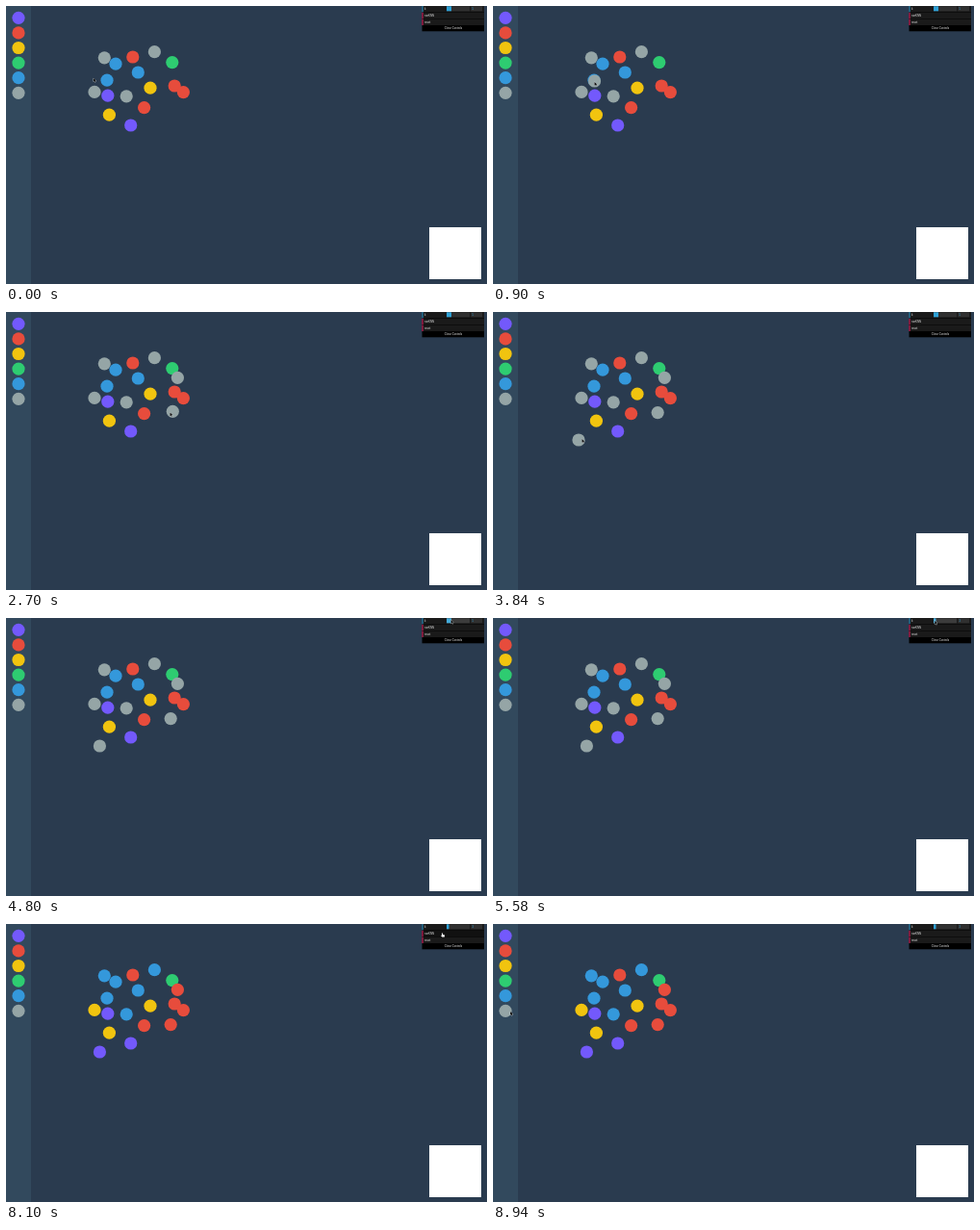
These frames come from a looping animation (500 by 289 pixels, 9000 ms). An HTML page with a canvas:

```html
<!DOCTYPE html>
<html lang="en">
<head>
<meta charset="utf-8">
<title>Nearest neighbours</title>
<style>
html, body { margin: 0; width: 100%; height: 100%; overflow: hidden; background: #2a3b4f; }
canvas { display: block; width: 500px; height: 289px; }
</style>
</head>
<body>
<canvas id="stage"></canvas>
<script>
const LOOP = 9000, CLASSIFY = 6660, K = 3;
const SLIDE = [5040, 5460];
const canvas = document.getElementById('stage');
const ctx = canvas.getContext('2d');
const dpr = window.devicePixelRatio || 1;
canvas.width = 500 * dpr;
canvas.height = 289 * dpr;

// Listed in palette order, top to bottom
const COLORS = {
  purple: '#7359fc', red: '#e74c3c', yellow: '#f1c40f',
  green: '#2ecc71', blue: '#3498db', gray: '#95a5a6'
};
const PALETTE = Object.keys(COLORS).map((kind, i) => ({ kind, x: 13, y: 12.3 + i * 15.6 }));
const SOURCE = PALETTE[5];

// Hand-placed points of each class; gray ones are still unknown
const PLACED = {
  gray: [[102.3, 53.8], [154.4, 47.7], [92, 89.4], [125.2, 93.8]],
  green: [[172.8, 58.6]],
  blue: [[114, 60.2], [137.3, 69], [105, 77.2]],
  red: [[131.8, 53], [175.2, 83], [184.4, 89.6], [143.6, 105.6]],
  yellow: [[150, 85.2], [107.4, 113.2]],
  purple: [[105.8, 93.2], [129.7, 124]]
};
const dots = Object.entries(PLACED).flatMap(
  ([kind, spots]) => spots.map(([x, y]) => ({ kind, x, y })));

// Pointer stops: time, x, y
const STOPS = [
  [0, 91, 75], [480, 13, 91.3], [1260, 178.4, 69.3], [1860, 8, 90],
  [1980, 10.2, 91.5], [2700, 170.5, 104.5], [2880, 168.4, 105.8],
  [3360, 16.5, 89.3], [3840, 92.5, 132], [4080, 100.9, 132],
  [4740, 462.5, 2], [SLIDE[0], 462.5, 2], [SLIDE[1], 460, 2],
  [6060, 453, 9.5], [8100, 453, 9.5], [8880, 18, 91], [LOOP, 18, 91]
];
// Grab and drop times of the points pulled out of the palette
const DRAGS = [[480, 1260], [1980, 2880], [3360, 4080]];

const clamp = (v, lo, hi) => Math.min(hi, Math.max(lo, v));
const ease = u => u * u * (3 - 2 * u);
const mix = (a, b, u) => a + (b - a) * u;

function pointer(t) {
  const i = Math.max(1, STOPS.findIndex(s => s[0] > t));
  const [t0, x0, y0] = STOPS[i - 1], [t1, x1, y1] = STOPS[i];
  const u = ease((t - t0) / (t1 - t0));
  return { x: mix(x0, x1, u), y: mix(y0, y1, u) };
}

function dragged([grab, drop], t) {
  const from = pointer(grab), now = pointer(Math.min(t, drop));
  return { kind: 'gray', x: SOURCE.x + now.x - from.x, y: SOURCE.y + now.y - from.y };
}

// Majority vote of the K nearest known points; a tie goes to the farther class
function classify(p) {
  if (p.kind !== 'gray') return p;
  const dist = q => Math.hypot(p.x - q.x, p.y - q.y);
  const near = dots.filter(q => q.kind !== 'gray')
    .sort((a, b) => dist(a) - dist(b)).slice(0, K);
  const votes = {};
  let kind, best = 0;
  for (const q of near) {
    votes[q.kind] = (votes[q.kind] || 0) + 1;
    if (votes[q.kind] >= best) {
      best = votes[q.kind];
      kind = q.kind;
    }
  }
  return { ...p, kind };
}

function drawDot({ x, y, kind }) {
  ctx.fillStyle = COLORS[kind];
  ctx.beginPath();
  ctx.arc(x, y, 6.6, 0, Math.PI * 2);
  ctx.fill();
}

function rect(x, y, w, h, color) {
  ctx.fillStyle = color;
  ctx.fillRect(x, y, w, h);
}

function label(s, x, y, align = 'left', color = '#eee') {
  ctx.fillStyle = color;
  ctx.textAlign = align;
  ctx.fillText(s, x, y);
}

function drawPanel(t, tip) {
  const level = pointer(clamp(t, ...SLIDE)).x - 457.5;
  const row = Math.floor(tip.y / 6.8);
  const over = tip.x > 432;

  rect(432.5, 0, 64.5, 26.3, '#000');
  ctx.font = '2.8px "Liberation Sans", Arial, sans-serif';
  ctx.textBaseline = 'middle';
  ['k', 'runKNN', 'reset'].forEach((name, i) => {
    const y = i * 6.8;
    rect(432.5, y, 64.5, 6.4, over && i && row === i ? '#111' : '#1a1a1a');
    rect(432.5, y, 1, 6.4, i ? '#e61d5f' : '#2fa1d6');
    label(name, 435, y + 3.2);
  });
  label('Close Controls', 465, 23.3, 'center');

  const hot = over && row === 0;
  rect(458, 0.3, 24, 5, hot ? '#3c3c3c' : '#303030');
  rect(458, 0.3, level, 5, hot ? '#44abda' : '#2fa1d6');
  rect(483.3, 0.3, 11.7, 5, '#303030');
  label(String(Math.round(level)), 484.5, 3, 'left', '#2fa1d6');
}

function polygon(points, fill, line) {
  ctx.beginPath();
  points.forEach(p => ctx.lineTo(...p));
  ctx.closePath();
  ctx.fillStyle = fill;
  ctx.strokeStyle = line;
  ctx.lineWidth = 0.6;
  ctx.stroke();
  ctx.fill();
}

function drawPointer({ x, y }) {
  ctx.save();
  ctx.translate(x, y);
  if (x > 432 && y > 6.8) {
    polygon([[0, 0], [0.9, 0], [1, 1.6], [3, 2], [2.8, 4], [0.3, 4], [-1.2, 2.3], [0, 2.4]],
      '#fff', '#222');
  } else {
    polygon([[0, 0], [0, 3.7], [0.9, 2.9], [1.5, 4.3], [2.1, 4], [1.6, 2.7], [2.7, 2.6]],
      '#111', '#d5dade');
  }
  ctx.restore();
}

function draw(t) {
  const tip = pointer(t);
  const pulled = DRAGS.filter(d => t >= d[0]).map(d => dragged(d, t));
  const points = [...dots, ...pulled];

  ctx.setTransform(dpr, 0, 0, dpr, 0, 0);
  rect(0, 0, 500, 289, '#2a3b4f');
  rect(0, 0, 26, 289, '#32495d');
  rect(440, 230, 54, 54, '#fff');
  PALETTE.forEach(drawDot);
  (t < CLASSIFY ? points : points.map(classify)).forEach(drawDot);
  drawPanel(t, tip);
  drawPointer(tip);
}

const start = performance.now();
function tick() {
  draw((performance.now() - start) % LOOP);
  requestAnimationFrame(tick);
}
tick();
</script>
</body>
</html>
```
